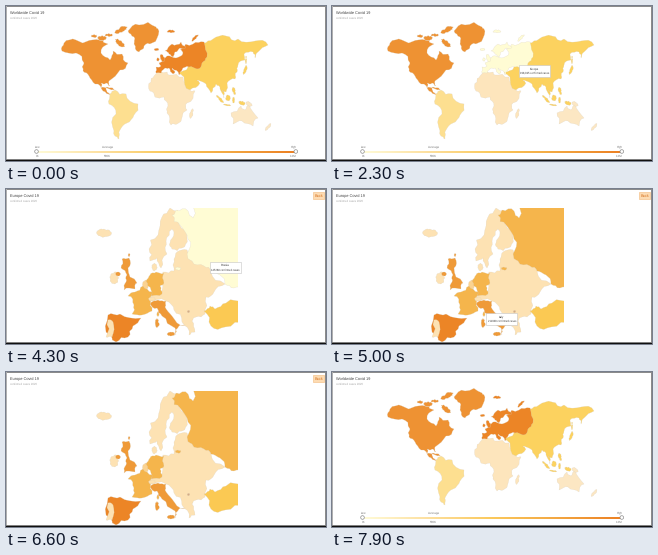
Animation of 320 by 155 pixels, one loop 8000 ms. Source, as a matplotlib script:

```python
import numpy as np
import matplotlib
import matplotlib.pyplot as plt
from matplotlib.animation import FuncAnimation
from matplotlib.colors import LinearSegmentedColormap, to_rgb
from matplotlib.patches import Circle, Polygon, Rectangle

matplotlib.rcParams.update({
    "toolbar": "None", "text.hinting": "none",
    "font.family": ["Liberation Sans", "DejaVu Sans"]})

W, H, DPI = 320, 155, 100
STEP, FRAMES = 100, 80
EUROPE_START, EUROPE_END = 3700, 7300
HOVER = np.array(to_rgb("#fffcd4"))
PALE, ORANGE, AMBER, DEEP = "#fde2b3", "#f5b54c", "#ef9a38", "#ec8526"
COLORS = {
    "North America": "#ee9233", "South America": "#fddf90",
    "Africa": "#fde5bc", "Asia": "#fcd25f", "Europe": DEEP,
    "Oceania": "#fce7c3", "Low": PALE, "Benelux": "#fbd391",
    "Kosovo": "#d5ab82", "Russia": ORANGE, "Turkey": "#fbc953",
    "Germany": ORANGE, "France": ORANGE, "Italy": AMBER, "Spain": DEEP,
    "UK": AMBER}

rng = np.random.default_rng(5)
fig = plt.figure(figsize=(W / DPI, H / DPI), dpi=DPI, facecolor="white")
ax = fig.add_axes([0, 0, 1, 1])
ax.axis("off")

world, europe = [], []
regions = {name: [] for name in COLORS}
close_up_window = Rectangle((85, 18.5), 146.5, 134.5, transform=ax.transData)


def text(x, y, label, px, color="#666666", group=None, **kw):
    artist = ax.text(x, y, label, fontsize=px * 72 / DPI, color=color,
                     va="center", **kw)
    if group is not None:
        group.append(artist)
    return artist


def coastline(corners, rounds=2, roughness=0.22):
    """Split every side repeatedly, pushing each midpoint off its line."""
    points = np.array(corners, float)
    for _ in range(rounds):
        side = np.roll(points, -1, axis=0) - points
        push = rng.uniform(-roughness, roughness, (len(points), 1))
        normal = side[:, ::-1] * (1, -1)
        middle = points + side / 2 + normal * push
        points = np.stack([points, middle], axis=1).reshape(-1, 2)
    return points


def land(name, *corners, group=europe):
    patch = Polygon(coastline(corners), facecolor=COLORS[name],
                    edgecolor="#d9cfbd", linewidth=0.15)
    ax.add_patch(patch)
    if group is europe:
        patch.set_clip_path(close_up_window)
    group.append(patch)
    regions[name].append(patch)


def isle(name, x, y, width, height, tilt=0, group=europe):
    turn = np.linspace(0, 2 * np.pi, 8, endpoint=False)
    u, v = width / 2 * np.cos(turn), height / 2 * np.sin(turn)
    c, s = np.cos(np.radians(tilt)), np.sin(np.radians(tilt))
    land(name, *zip(x + u * c - v * s, y + u * s + v * c), group=group)


def draw_world():
    def part(name, *corners):
        land(name, *corners, group=world)

    def island(name, *shape):
        isle(name, *shape, group=world)

    part("North America", (56, 45), (58, 37), (70, 34), (97, 35), (102, 38),
         (95, 47), (104, 54), (107, 45), (116, 48), (122, 57), (114, 64),
         (103, 75), (104, 80), (100, 77), (95, 77), (95, 82), (100, 82),
         (101, 86), (105, 89), (97, 85), (89, 78), (83, 70), (77, 65),
         (78, 57), (70, 47))
    part("North America", (122, 25), (133, 19), (150, 21), (153, 25),
         (146, 37), (138, 40), (133, 46), (128, 38), (128, 31))
    island("North America", 115, 24, 14, 5, -25)
    island("North America", 114, 37, 12, 5, 40)
    island("North America", 96, 32, 9, 5)
    island("North America", 88, 30, 6, 3)
    island("North America", 103, 29, 8, 3)
    island("North America", 104, 82.5, 9, 1.5, 15)
    part("South America", (104, 88), (109, 84), (120, 88), (132, 98),
         (128, 109), (121, 117), (114, 124), (113, 133), (109, 130),
         (108, 125), (110, 108), (103, 98))
    part("Africa", (148, 70), (161, 66), (163, 69), (177, 71), (185, 85),
         (189, 85), (181, 97), (181, 104), (171, 118), (165, 119),
         (161, 107), (162, 100), (158, 91), (149, 91), (144, 85), (145, 76))
    island("Africa", 185.5, 107.5, 3, 10, 15)

    part("Asia", (197, 37), (207, 33), (220, 30), (232, 33), (249, 35),
         (262, 39), (252, 46), (249, 52), (247, 46), (238, 48), (239, 54),
         (232, 59), (231, 66), (229, 73), (221, 77), (220, 86), (216, 84),
         (218, 92), (214, 83), (210, 78), (205, 87), (200, 78), (191, 74),
         (194, 77), (184, 84), (178, 71), (172, 66), (182, 61), (196, 52))
    island("Asia", 239, 64, 2.5, 10, 20)
    island("Asia", 240, 54, 1.5, 8)
    island("Asia", 214, 93, 11, 2.5, 45)
    island("Asia", 222, 92, 5, 6)
    island("Asia", 221, 99, 8, 1.5, 8)
    island("Asia", 227.5, 94, 2.5, 6)
    island("Asia", 228, 85, 3, 8, -15)
    island("Asia", 236, 97, 7, 4, 15)

    part("Europe", (150, 67), (150, 61), (155, 60), (153, 57), (161, 50),
         (170, 52), (177, 47), (174, 43), (187, 38), (198, 36), (201, 51),
         (196, 57), (191, 63), (183, 61), (176, 64), (173, 69), (166, 62),
         (169, 66), (167, 68), (163, 62), (157, 64), (155, 67))
    part("Europe", (159, 45), (166, 38), (175, 36), (180, 41), (174, 42),
         (169, 46), (167, 51), (163, 48))
    island("Europe", 156.5, 52, 4, 8, -20)
    island("Europe", 152, 53.5, 2.5, 3.5)
    island("Europe", 150.5, 43.5, 5, 2.5)
    island("Europe", 165, 25.5, 8, 2.5)
    island("Europe", 189, 32, 9, 2.5, -45)

    part("Oceania", (225, 107), (235, 100), (239, 104), (243, 99),
         (252, 112), (247, 120), (236, 115), (227, 118))
    island("Oceania", 243, 98, 7, 4, 25)
    island("Oceania", 262, 121, 9, 2.5, -50)


def draw_europe():
    isle("Low", 98, 44, 15, 8)
    land("Low", (144, 72), (143, 60), (152, 46), (156, 28), (164, 19),
         (172, 21), (173, 35), (181, 50), (176, 59), (166, 60), (164, 54),
         (168, 44), (166, 40), (160, 52), (161, 65), (155, 79), (151, 69))
    land("Low", (157, 83), (168, 82), (168, 70), (171, 63), (181, 61),
         (186, 72), (205, 82), (219, 95), (208, 103), (200, 108),
         (199, 125), (190, 128), (186, 132), (189, 143), (183, 146),
         (176, 133), (168, 121), (160, 112), (142, 113), (145, 106),
         (156, 102))
    isle("Low", 148.5, 78, 5, 8)
    isle("Low", 108.5, 89, 9, 12)
    isle("Kosovo", 182.5, 122.5, 2.5, 2.5)
    land("Russia", (188, 10), (240, 10), (240, 101), (228, 99), (219, 95),
         (214, 86), (205, 82), (198, 77), (186, 72), (181, 65), (182, 50),
         (174, 36), (166, 26), (170, 21), (182, 22), (187, 29))
    isle("Russia", 172, 79.5, 6, 3)
    land("Turkey", (198, 122), (204, 117), (209, 120), (220, 114),
         (240, 112), (240, 134), (219, 138), (205, 137))
    isle("Benelux", 139.5, 96, 6, 10)
    land("Germany", (140, 92), (144, 86), (150, 83), (158, 84), (158, 94),
         (154, 97), (156, 105), (145, 107), (145, 101))
    land("France", (122, 107), (129, 103), (137, 97), (146, 103),
         (143, 110), (146, 122), (136, 126), (126, 125), (128, 116))
    isle("France", 152, 125, 2, 5)
    isle("Low", 146, 110, 7, 4)
    land("Italy", (144, 115), (152, 111), (160, 112), (159, 118),
         (166, 127), (179, 136), (173, 137), (170, 146), (169, 139),
         (156, 127), (151, 119))
    isle("Italy", 165, 145, 8, 4)
    isle("Italy", 151, 134, 4, 9)
    land("Spain", (102, 126), (114, 125), (135, 129), (127, 137),
         (122, 148), (110, 153), (105, 147))
    land("Low", (102, 131), (107, 133), (106, 148), (100, 148))
    land("UK", (118, 101), (120, 93), (121, 86), (115, 79), (116, 70),
         (123, 69), (122, 79), (131, 94), (129, 100))
    isle("UK", 112, 85, 5, 4)
    isle("UK", 123, 66, 2, 3)


draw_world()
draw_europe()

# Page frame and heading
for xy, size, shade in [((0, 0), (W, 1), "#8c8c8c"),
                        ((0, 0), (1, H), "#b0b0b0"),
                        ((W - 1, 0), (1, H), "#8c8c8c"),
                        ((0, H - 2), (W, 1), "#808080"),
                        ((0, H - 1), (W, 1), "#101010")]:
    ax.add_patch(Rectangle(xy, *size, color=shade, linewidth=0))
title = text(4.2, 7, "", 3.9, "#444444")
text(4.3, 11.8, "confirmed cases 2020", 2.7, "#a5a5a5")

# Value slider
ramp = LinearSegmentedColormap.from_list(
    "ramp", ["#fffbd8", "#fde0a0", "#fbc95c", "#f3a742", "#ec8023"])
world.append(ax.imshow(np.linspace(0, 1, 256)[None], cmap=ramp,
                       aspect="auto", extent=(30, 290, 147, 145)))
for x in (30.5, 289.8):
    world.append(ax.add_patch(
        Circle((x, 145.5), 1.8, facecolor="white", edgecolor="#8c8c8c",
               linewidth=0.5, zorder=2)))
for x, name, value in [(32, "Low", "0K"), (101.5, "Average", "500K"),
                       (288, "High", "1.2M")]:
    text(x, 141, name, 3.0, "#777777", world, ha="center")
    text(x - 0.5, 150.4, value, 3.0, "#777777", world, ha="center")

# Back button
button = [ax.add_patch(Rectangle((307.3, 3), 10.8, 7, facecolor="#fddbb2",
                                 edgecolor="#f5c48f", linewidth=0.5)),
          text(312.7, 6.6, "Back", 3.6, "#e0904a", ha="center",
               weight="bold")]

# Tooltip
tip_box = ax.add_patch(Rectangle((0, 0), 31, 11.4, facecolor="white",
                                 edgecolor="#c4c4c4", linewidth=0.4,
                                 zorder=5))
tip_name = text(0, 0, "", 2.9, "#333333", ha="center", zorder=6)
tip_cases = text(0, 0, "", 2.6, "#333333", ha="center", zorder=6)
CASES = {"Europe": "998,095", "Russia": "145268", "Italy": "211938"}
ax.set_xlim(0, W)
ax.set_ylim(H, 0)

# region: fade-in start, fade-in end, fade-out start, fade-out end
HOVERS = {"Europe": (1800, 2200, 3700, 3701),
          "Russia": (3800, 4200, 4700, 5000),
          "Italy": (5100, 5500, 5900, 6100),
          "Spain": (5900, 6100, 6200, 6600)}
# region, shown from, hidden at, path of (time, x, y)
TIPS = [("Europe", 1900, 3700, [(1900, 191, 62.5), (2300, 187.3, 59.2),
                                (2700, 187.3, 59.2), (2900, 184.8, 58.8)]),
        ("Russia", 4000, 4900, [(4000, 196, 67), (4300, 203.5, 73),
                                (4700, 203.5, 73), (5000, 154.3, 124.4)]),
        ("Italy", 4900, 5700, [(4700, 203.5, 73), (5000, 154.3, 124.4)])]


def place_tip(now):
    shown = [tip for tip in TIPS if tip[1] <= now < tip[2]]
    for artist in (tip_box, tip_name, tip_cases):
        artist.set_visible(bool(shown))
    if shown:
        name, _, _, path = shown[0]
        times, xs, ys = zip(*path)
        x, y = np.interp(now, times, xs), np.interp(now, times, ys)
        tip_box.set_xy((x, y))
        tip_name.set_position((x + 15.5, y + 3.6))
        tip_cases.set_position((x + 15.5, y + 7.9))
        tip_name.set_text(name)
        tip_cases.set_text(CASES[name] + " confirmed cases")


def update(frame):
    now = frame * STEP
    close_up = EUROPE_START <= now < EUROPE_END
    for artist in world:
        artist.set_visible(not close_up)
    for artist in europe:
        artist.set_visible(close_up)
    for artist in button:
        artist.set_visible(close_up and now > EUROPE_START)
    title.set_text(("Europe" if close_up else "Worldwide") + " Covid 19")
    for name, times in HOVERS.items():
        level = np.interp(now, times, (0, 1, 1, 0))
        base = np.array(to_rgb(COLORS[name]))
        for patch in regions[name]:
            patch.set_facecolor(base + (HOVER - base) * level)
    place_tip(now)
    return []


anim = FuncAnimation(fig, update, frames=FRAMES, interval=STEP, repeat=True,
                     repeat_delay=0, blit=False)
plt.show()
```
